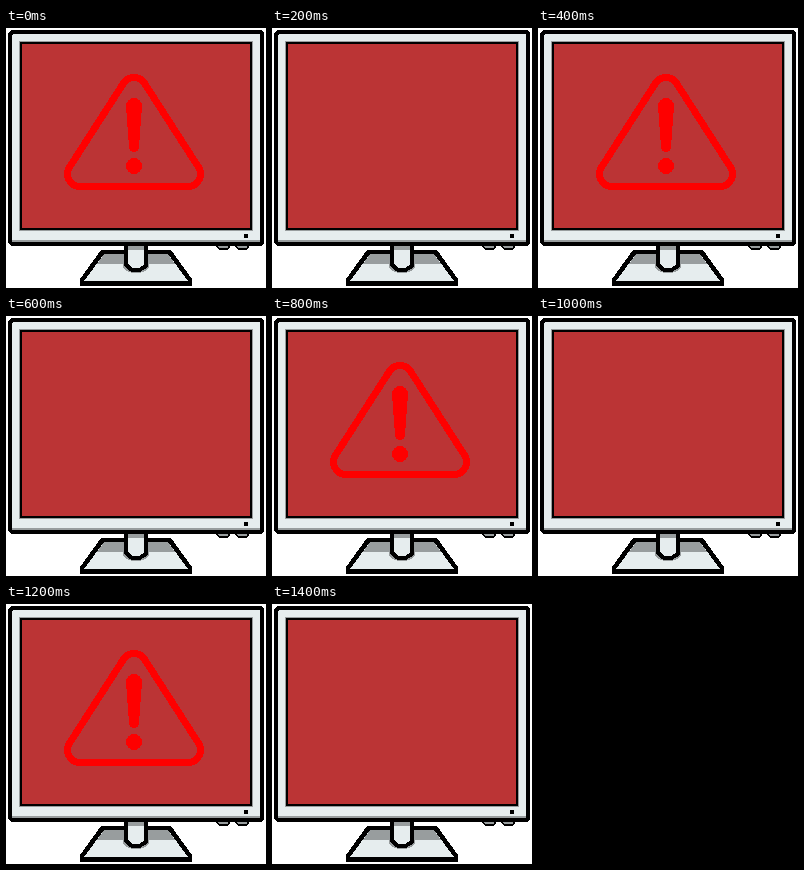
Write an HTML page that moves like this. It is 260 by 260 pixels and loops after 1600 ms.

```html
<!DOCTYPE html>
<html lang="en">
<head>
<meta charset="utf-8">
<title>Warning monitor</title>
<style>
  html, body { margin: 0; width: 100%; height: 100%; overflow: hidden; background: #fff; }
  svg { display: block; width: 100vw; height: 100vh; shape-rendering: crispEdges; }
  .plastic { fill: #e6edee; }
  .shade { fill: #989d9e; }
  .warning { animation: blink 400ms step-end infinite; }
  @keyframes blink {
    0% { visibility: visible; }
    50%, 100% { visibility: hidden; }
  }
</style>
</head>
<body>
<svg viewBox="0 0 260 260">
  <!-- base -->
  <path d="M95 222H165L186 251V258H74V251Z"/>
  <path class="plastic" d="M98 226H162L182 253H78Z"/>
  <path class="shade" d="M98 226H162L169 236H91Z"/>

  <!-- neck -->
  <path class="shade" d="M117 236H143V240L139 243L134 245H126L121 243L117 240Z"/>
  <path d="M118 214H142V238L139 241L134 244H126L121 241L118 238Z"/>
  <path class="plastic" d="M122 217H138V236L136 238L133 240H127L124 238L122 236Z"/>
  <path class="shade" d="M122 217H138V222H122Z"/>

  <!-- buttons -->
  <path d="M210 217H224V219L221 222H213L210 219ZM229 217H243V219L240 222H232L229 219Z"/>
  <path class="shade" d="M212 217H222V219L221 220H213L212 219ZM231 217H241V219L240 220H232L231 219Z"/>

  <!-- case -->
  <path d="M5 2H255L258 5V215L255 218H5L2 215V5Z"/>
  <path class="plastic" d="M7 6H253L254 7V213L253 214H7L6 213V7Z"/>
  <path class="shade" d="M6 212H254V214H6Z"/>
  <rect x="238" y="206" width="4" height="4"/>

  <!-- screen -->
  <rect class="shade" x="13" y="13" width="234" height="190"/>
  <rect x="14" y="14" width="232" height="188"/>
  <rect x="16" y="16" width="228" height="184" fill="#bb3435"/>

  <g class="warning" fill="#fe0000">
    <path d="M63.5 139.2L117.5 55.2A12.5 12.5 0 0 1 138.5 55.2L192.5 139.2A12.5 12.5 0 0 1 182 158.5H74A12.5 12.5 0 0 1 63.5 139.2Z"
          fill="none" stroke="#fe0000" stroke-width="7"/>
    <path d="M120 78A8 8 0 0 1 136 78L133 119A5 5 0 0 1 123 119Z"/>
    <circle cx="128" cy="138" r="8"/>
  </g>
</svg>
</body>
</html>
```
